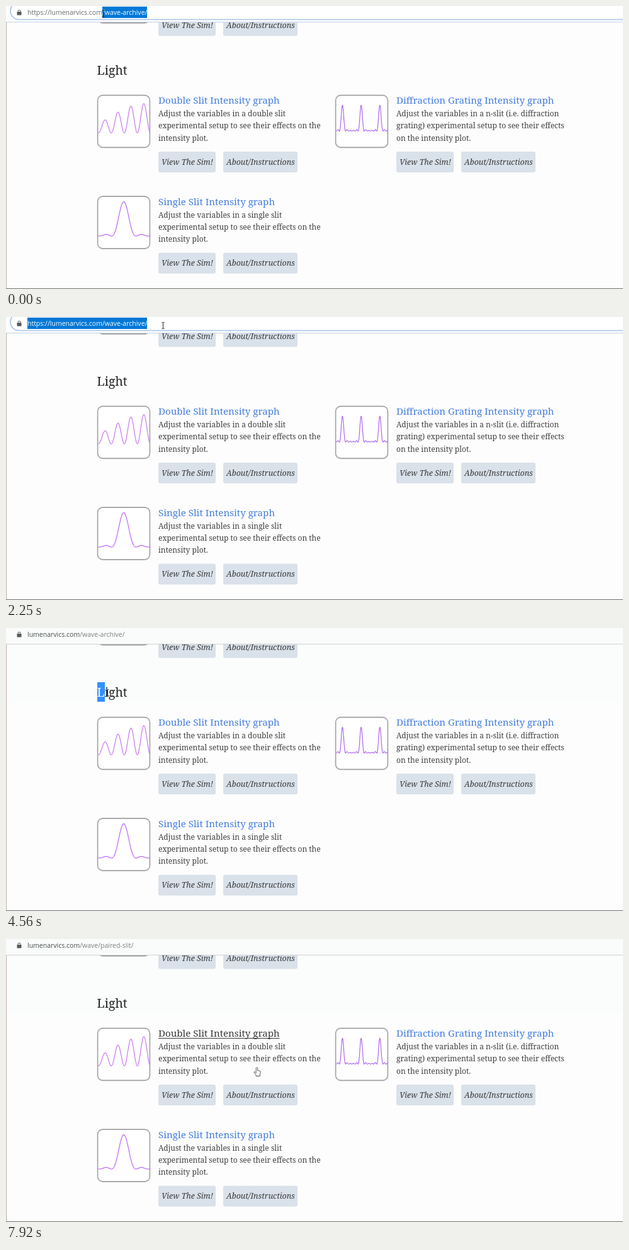
An HTML page with a canvas for the animation above (8 s loop, 980 px wide and 449 px high).

```html
<!DOCTYPE html>
<html lang="en">
<head>
<meta charset="utf-8">
<title>Simulation list</title>
<style>
  html, body { margin: 0; width: 100%; height: 100%; overflow: hidden; background: #fdfdfd; }
  canvas { display: block; }
</style>
</head>
<body>
<canvas id="stage" width="980" height="449"></canvas>
<script>
const ctx = document.getElementById('stage').getContext('2d');
const LOOP = 8000;
const serif = (size, style = '') => `${style} ${size}px "Noto Serif", serif`;
const URL_FONT = '10.5px "Open Sans", sans-serif';
const TITLE_FONT = serif(15.14);
const HOST = 'lumenarvics.com';
const LIST_PATH = '/wave-archive/';
const FULL_URL = 'https://' + HOST + LIST_PATH;
const URL_X = 34;

// Pointer stops: time, x, y, shape
const POINTER = [
  [0, 154, 12, 'beam'], [130, 130, 12, 'beam'], [280, 96, 12, 'beam'], [430, 65, 12, 'beam'],
  [580, 44, 12, 'beam'], [740, 36, 12, 'beam'], [1000, 38, 13, 'beam'], [1120, 42, 14, 'arrow'],
  [1240, 44, 16, 'arrow'], [1360, 49, 21, 'arrow'], [1480, 54, 26, 'arrow'], [1740, 55, 26, 'arrow'],
  [1890, 110, 22, 'arrow'], [2010, 195, 14, 'beam'], [2130, 238, 13, 'beam'], [2250, 249, 13, 'beam'],
  [3170, 240, 30, 'arrow'], [3320, 159, 63, 'arrow'], [3470, 133, 79, 'arrow'], [3620, 140, 94, 'arrow'],
  [3760, 145, 102, 'beam'], [3900, 146, 103, 'beam'], [4020, 147, 104, 'beam'], [4290, 148, 105, 'beam'],
  [4560, 161, 102, 'beam'], [4690, 188, 103, 'beam'], [4840, 209, 106, 'beam'], [5390, 217, 109, 'arrow'],
  [5510, 228, 119, 'arrow'], [5660, 265, 142, 'arrow'], [5810, 290, 147, 'hand'], [5940, 301, 150, 'hand'],
  [6070, 309, 151, 'hand'], [6210, 316, 152, 'hand'], [7920, 398, 203, 'hand']
];

function rect(x, y, w, h, color) {
  ctx.fillStyle = color;
  ctx.fillRect(x, y, w, h);
}

function label(str, x, y, font, color, align = 'left') {
  ctx.font = font;
  ctx.fillStyle = color;
  ctx.textAlign = align;
  ctx.fillText(str, x, y);
}

function widthOf(str, font) {
  ctx.font = font;
  return ctx.measureText(str).width;
}

// Repaints part of a label in white on a selection colour
function select(str, x, y, font, from, to, top, height, color) {
  const left = x + widthOf(str.slice(0, from), font);
  const right = x + widthOf(str.slice(0, to), font);
  ctx.save();
  ctx.beginPath();
  ctx.rect(Math.round(left), top, Math.round(right) - Math.round(left), height);
  ctx.clip();
  rect(left - 1, top, right - left + 2, height, color);
  label(str, x, y, font, '#fff');
  ctx.restore();
}

function nearestChar(str, x, font) {
  let best = 0;
  for (let i = 1; i <= str.length; i++) {
    const gap = n => Math.abs(widthOf(str.slice(0, n), font) - x);
    if (gap(i) < gap(best)) best = i;
  }
  return best;
}

// y maps x to the curve's distance below the thumbnail's top
const plots = {
  double: {
    color: '#c878ef',
    y: x => 60.3 - 46.5 * Math.cos((x - 76) * 0.0132) ** 2 * Math.sin(Math.PI * (x - 1.5) / 20.7) ** 2
  },
  grating: {
    color: '#ae68ee',
    y: x => {
      const a = Math.PI * (x - 11.4) / 29.7 + 1e-6;
      return 57.5 - 41 * (Math.sin(6 * a) / (6 * Math.sin(a))) ** 2;
    }
  },
  single: {
    color: '#bd66f4',
    y: x => {
      const a = Math.PI * (x - 42) / 19.5 + 1e-6;
      return 63.5 - 54.5 * (Math.sin(a) / a) ** 2;
    }
  }
};

function thumbnail(x, y, plot) {
  ctx.beginPath();
  ctx.roundRect(x + 0.6, y + 0.6, 82.8, 82.8, 8);
  ctx.fillStyle = '#fff';
  ctx.fill();
  ctx.strokeStyle = '#a09ea2';
  ctx.lineWidth = 1.6;
  ctx.stroke();
  if (!plot) return;
  ctx.beginPath();
  for (let i = 1.5; i <= 83; i += 0.25) ctx.lineTo(x + i, y + plot.y(i));
  ctx.strokeStyle = plot.color;
  ctx.lineWidth = 1.2;
  ctx.stroke();
}

function button(str, x, y, w) {
  ctx.beginPath();
  ctx.roundRect(x, y, w, 33, 3);
  ctx.fillStyle = '#d9e1ea';
  ctx.fill();
  label(str, x + w / 2 + 0.4, y + 20.5, serif(12.45, 'italic'), '#3a3a3a', 'center');
}

function buttons(x, y) {
  button('View The Sim!', x, y, 91);
  button('About/Instructions', x + 103, y, 118);
}

function card(x, y, plot, title, lines, hover) {
  const textX = x + 97;
  thumbnail(x, y, plot);
  label(title, textX, y + 14, TITLE_FONT, hover ? '#383838' : '#447de0');
  if (hover) rect(textX, y + 16, widthOf(title, TITLE_FONT), 1, '#383838');
  lines.forEach((line, i) => label(line, textX, y + 34 + i * 19.3, serif(12.06), '#404040'));
  buttons(textX, y + 90);
}

function page(t) {
  const hover = t >= 5810;
  rect(0, 0, 980, 449, '#fdfdfd');
  if (t >= 4560) rect(5, 26, 975, 91, '#fbfdfc');
  thumbnail(145, -56.5);
  buttons(242, 14.5);

  const headFont = serif(19.5);
  label('Light', 144.5, 109, headFont, '#222');
  const picked = t < 4560 || t >= 5250 ? 0 : t < 4690 ? 1 : t < 4840 ? 4 : 5;
  if (picked) select('Light', 144.5, 109, headFont, 0, picked, 86, 31, '#3390ff');

  const rest = ['experimental setup to see their effects on the', 'intensity plot.'];
  card(145, 141, plots.double, 'Double Slit Intensity graph',
    ['Adjust the variables in a double slit', ...rest], hover);
  card(523, 141, plots.grating, 'Diffraction Grating Intensity graph',
    ['Adjust the variables in a n-slit (i.e. diffraction',
     'grating) experimental setup to see their effects', 'on the intensity plot.']);
  card(145, 301.5, plots.single, 'Single Slit Intensity graph',
    ['Adjust the variables in a single slit', ...rest]);
  rect(0, 26, 1, 423, '#b9aca2');
  rect(0, 448, 980, 1, '#6f6f6f');
}

function addressBar(t, pointerX) {
  const focused = t < 4560;
  rect(0, 0, 980, 25, focused ? '#fdfdfd' : '#fafcfb');
  rect(0, 25, 980, 1, focused ? '#c3d3e3' : '#cfd3d4');
  if (focused) {
    ctx.beginPath();
    ctx.roundRect(7, -6, 1000, 27.5, 13.5);
    ctx.fillStyle = '#fff';
    ctx.fill();
    ctx.strokeStyle = '#a5c3ea';
    ctx.lineWidth = 1.6;
    ctx.stroke();
  }

  rect(17.5, 9, 7, 5.5, '#55595c');
  ctx.beginPath();
  ctx.arc(21, 8.5, 2, Math.PI, 0);
  ctx.strokeStyle = '#55595c';
  ctx.lineWidth = 1.2;
  ctx.stroke();

  if (!focused) {
    const path = t < 7920 ? LIST_PATH : '/wave/paired-slit/';
    label(HOST, URL_X, 14, URL_FONT, '#45494c');
    label(path, URL_X + widthOf(HOST, URL_FONT), 14, URL_FONT, '#7b7f82');
    return;
  }
  label(FULL_URL, URL_X, 14, URL_FONT, '#666b69');
  if (t < 2660) {
    const from = t < 740 ? nearestChar(FULL_URL, pointerX - URL_X, URL_FONT) : 0;
    select(FULL_URL, URL_X, 14, URL_FONT, from, FULL_URL.length, 1, 18, '#0078d7');
  } else if (t < 3170 || (t >= 3760 && t < 4290)) {
    rect(Math.round(URL_X + widthOf(FULL_URL, URL_FONT)), 2, 1, 16, '#333');
  }
}

const shapes = {
  arrow: new Path2D('M0 0V11.2L2.6 8.8 4.4 12.8 6.2 12 4.5 8.1H8Z'),
  hand: new Path2D('M-1.3 7V1Q0-.6 1.2 1V5L4.6 5.8Q6 6.2 5.8 8L4.8 11.6V14H-1.5V12L-4.6 8.2Q-4.4 6.4-2.8 7.4L-1.3 9Z'),
  beam: new Path2D('M-2-5H-.6L0-4.4 .6-5H2M0-4.4V4.4M-2 5H-.6L0 4.4 .6 5H2')
};

function drawPointer([, x, y, kind]) {
  ctx.save();
  ctx.translate(x + 0.5, y + 0.5);
  if (kind !== 'beam') {
    ctx.fillStyle = '#fff';
    ctx.fill(shapes[kind]);
  }
  ctx.strokeStyle = kind === 'beam' ? '#222' : '#444';
  ctx.lineWidth = kind === 'beam' ? 1 : 0.9;
  ctx.stroke(shapes[kind]);
  ctx.restore();
}

function draw() {
  const t = performance.now() % LOOP;
  const pointer = POINTER.findLast(stop => stop[0] <= t);
  page(t);
  addressBar(t, pointer[1]);
  drawPointer(pointer);
  requestAnimationFrame(draw);
}
draw();
</script>
</body>
</html>
```
